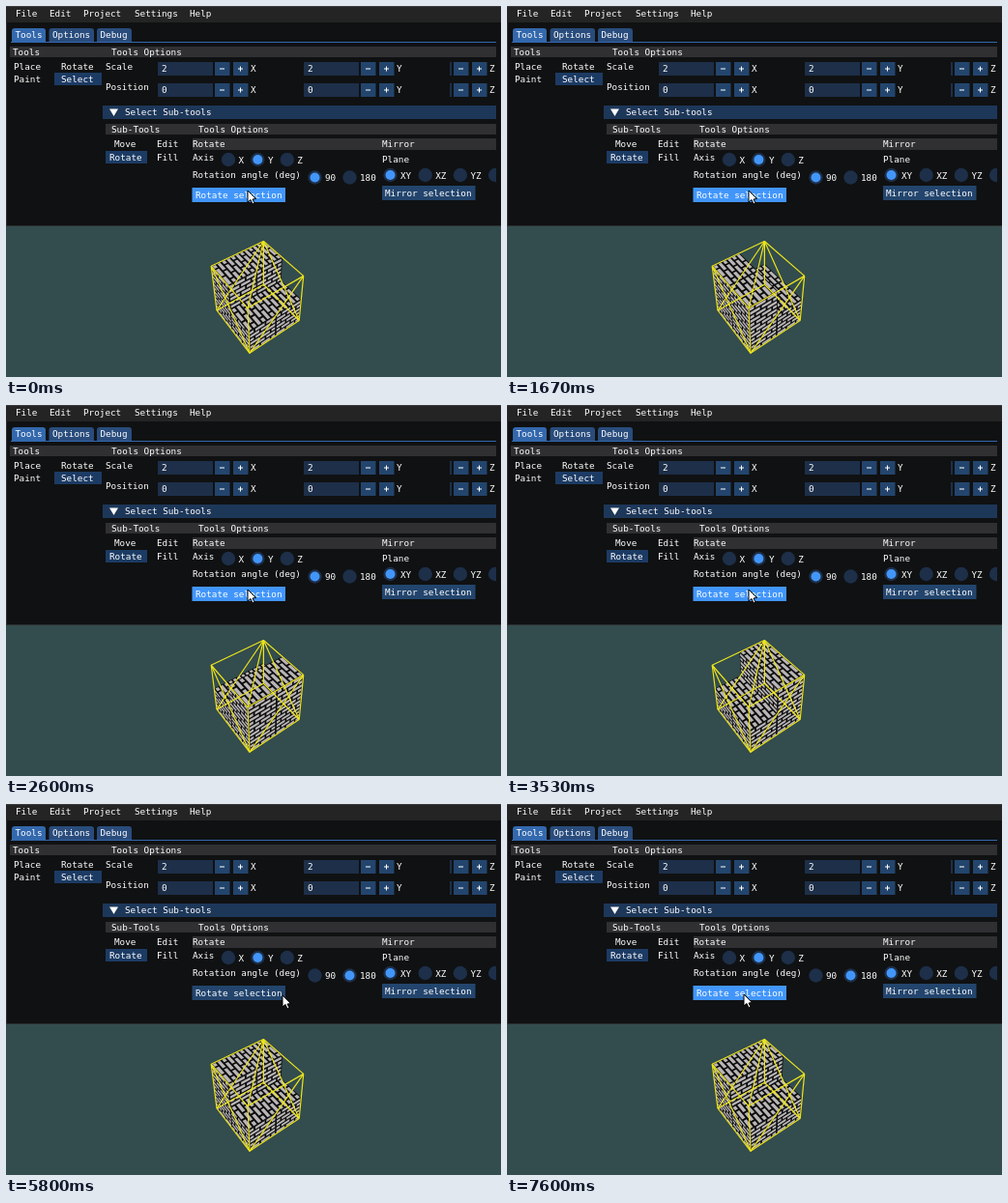
Recreate the animation shown at these times as an HTML page with a canvas. Size 512 px wide and 384 px high, loop 7.67 s.

```html
<!DOCTYPE html>
<html>
<head>
<meta charset="utf-8">
<style>
html, body { margin: 0; width: 100%; height: 100%; overflow: hidden; background: #334c4d; }
canvas { display: block; }
</style>
</head>
<body>
<canvas id="stage" width="512" height="384"></canvas>
<script>
const g = document.getElementById('stage').getContext('2d');
const LOOP = 7670;
const BUTTON = '#23456d', CHOSEN = '#1c3b64', FIELD = '#1d2f49', BRIGHT = '#4296fa';
const HEADER = '#303033', BORDER = '#2c2d31', YELLOW = '#ece51c';

function box(x1, y1, x2, y2, color) {
  g.fillStyle = color;
  g.fillRect(x1, y1, x2 - x1, y2 - y1);
}

function label(text, x, y) {
  g.fillStyle = '#fff';
  g.fillText(text, x, y + 3.4);
}

function disc(x, y, r, color) {
  g.fillStyle = color;
  g.beginPath();
  g.arc(x, y, r, 0, 7);
  g.fill();
}

function path(points) {
  g.beginPath();
  points.forEach(q => g.lineTo(...q));
}

function poly(points, color) {
  path(points);
  g.closePath();
  g.fillStyle = color;
  g.fill();
}

// ---- Mouse ----
const stops = [
  [0, 250, 191], [4900, 250, 191], [5300, 355, 177], [5610, 355, 177],
  [5800, 286, 198], [5930, 286, 198], [6150, 245, 197], [LOOP, 245, 197]
];

function mouseAt(t) {
  const i = stops.findIndex(s => s[0] > t);
  const [t0, x0, y0] = stops[i - 1], [t1, x1, y1] = stops[i];
  const k = (t - t0) / (t1 - t0), e = k * k * (3 - 2 * k);
  return [x0 + (x1 - x0) * e, y0 + (y1 - y0) * e];
}

function drawCursor([x, y]) {
  const shape = [[0, 0], [0, 12], [3, 9.5], [5, 14], [7, 13], [5, 9], [8.5, 8.6]];
  poly(shape.map(([dx, dy]) => [x + dx, y + dy]), '#fff');
  g.strokeStyle = '#000';
  g.lineWidth = 1;
  g.stroke();
}

// ---- Panel ----
function radio(x, y, text, on, mouse) {
  const hover = Math.hypot(mouse[0] - x, mouse[1] - y) < 7;
  disc(x, y, 7.2, hover ? BUTTON : FIELD);
  if (on) disc(x, y, 5, BRIGHT);
  label(text, x + 10.5, y + .5);
}

function stepButton(x, y, plus) {
  box(x, y - 7, x + 15.5, y + 7, BUTTON);
  box(x + 5, y - .5, x + 10, y + .5, '#fff');
  if (plus) box(x + 7, y - 2.5, x + 8, y + 2.5, '#fff');
}

function stepper(x, y, value, axis) {
  box(value ? x : x + 55, y - 7, x + 57, y + 7, FIELD);
  label(value, x + 4, y);
  stepButton(x + 59, y, false);
  stepButton(x + 78, y, true);
  label(axis, x + 96, y);
}

function drawPanel(t, mouse) {
  box(0, 0, 512, 228, '#101112');
  box(0, 17, 1, 228, BORDER);
  box(0, 227, 512, 228, BORDER);
  box(0, 0, 512, 17, '#242424');
  box(0, 0, 512, 1, '#39393c');
  [['File', 10], ['Edit', 45], ['Project', 80], ['Settings', 133], ['Help', 190]]
    .forEach(([s, x]) => label(s, x, 8));

  [['Tools', 6, 41], ['Options', 44.5, 91], ['Debug', 94, 130]].forEach(([s, x1, x2], i) => {
    g.fillStyle = i ? '#294c7c' : '#3368ad';
    g.beginPath();
    g.roundRect(x1, 23, x2 - x1, 14, [3, 3, 0, 0]);
    g.fill();
    label(s, x1 + 3.5, 30);
  });
  box(5, 37, 507, 38, '#3368ad');

  g.save();
  g.beginPath();
  g.rect(0, 0, 507, 228);
  g.clip();

  box(4, 42, 507, 53, HEADER);
  label('Tools', 7, 47.5);
  label('Tools Options', 109, 47.5);
  box(50, 69, 99, 82, CHOSEN);
  label('Place', 8, 62.5);
  label('Rotate', 57, 62.5);
  label('Paint', 8, 76);
  label('Select', 57, 76);

  [['Scale', '2', 65, 62.5], ['Position', '0', 87, 84]].forEach(([s, v, y, ty]) => {
    label(s, 103, ty);
    stepper(157, y, v, 'X');
    stepper(308, y, v, 'Y');
    stepper(404, y, '', 'Z');
  });

  box(100, 103, 507, 117, '#1d3759');
  poly([[107, 106.5], [116, 106.5], [111.5, 114]], '#fff');
  label('Select Sub-tools', 123, 110);

  box(103, 122, 507, 133, HEADER);
  label('Sub-Tools', 109, 128);
  label('Tools Options', 199, 128);
  label('Move', 112, 143);
  label('Edit', 156, 143);
  box(103, 150, 146, 163, CHOSEN);
  label('Rotate', 107, 157);
  label('Fill', 156, 157);

  box(193, 137, 507, 149, HEADER);
  label('Rotate', 193, 143);
  label('Mirror', 389, 143);
  label('Axis', 193, 157);
  ['X', 'Y', 'Z'].forEach((s, i) => radio(230 + 30.4 * i, 159, s, i == 1, mouse));
  label('Plane', 389, 159);
  label('Rotation angle (deg)', 193, 175);
  const half = t >= 5450;
  radio(319.5, 177.5, '90', !half, mouse);
  radio(355.5, 177.5, '180', half, mouse);
  ['XY', 'XZ', 'YZ', ''].forEach((s, i) => radio(397.5 + 36.2 * i, 175, s, i == 0, mouse));

  const hover = mouse[0] < 286 && mouse[1] >= 188;
  box(192.5, 188, 289, 203, hover ? BRIGHT : BUTTON);
  label('Rotate selection', 196, 196);
  box(389, 186, 485.5, 201, BUTTON);
  label('Mirror selection', 392, 194);
  g.restore();
}

// ---- Model: a runs to the left, b to the right, c up, from the nearest bottom corner ----
function project(a, b, c) {
  const w = 1 + .13 * a + .095 * b - .12 * c;
  return [(252 - 5.66 * a + 80 * b - 32 * c) / w,
          (359.3 - 3.35 * a - 2.9 * b - 84 * c) / w];
}

function patch(at, u1, v1, u2, v2, color) {
  poly([at(u1, v1), at(u2, v1), at(u2, v2), at(u1, v2)], color);
}

function brickFace(at) {
  const rows = 6, cols = 2.5;
  patch(at, 0, 0, 1, 1, '#0b0b0c');
  for (let r = 0; r < rows; r++) {
    for (let i = 0; i <= cols + 1; i++) {
      const start = i - (r % 2) / 2;
      const u1 = Math.max(.03, (start + .08) / cols), u2 = Math.min(.97, (start + .92) / cols);
      if (u2 > u1) patch(at, u1, (r + .18) / rows, u2, (r + .82) / rows, '#b9b5b6');
    }
  }
}

function voxel(a, b, c) {
  brickFace((u, v) => project(a, b + u / 2, c + v / 2));
  brickFace((u, v) => project(a + u / 2, b, c + v / 2));
  brickFace((u, v) => project(a + u / 2, b + v / 2, c + .5));
}

// Which half of the stairs is high, for each quarter turn
const high = [(a, b) => a > 0, (a, b) => b == 0, (a, b) => a == 0, (a, b) => b > 0];
const turns = [[1000, 1], [2100, 1], [3200, 1], [4300, 1], [6530, 2], [7270, 2]];

// Selection wireframe, seen through the bricks; each end is a corner written as its a, b, c
const wires = '000-100 000-010 100-110 010-110 000-001 100-101 010-011 110-111 ' +
  '001-101 001-011 101-111 011-111 111-001 111-100 111-010 101-000 011-000';

function drawWires() {
  g.strokeStyle = YELLOW;
  g.lineWidth = 1.2;
  wires.split(' ').forEach(pair => {
    path(pair.split('-').map(s => project(+s[0], +s[1], +s[2])));
    g.stroke();
  });
}

function drawModel(t) {
  const turn = turns.reduce((n, [at, q]) => n + (t >= at ? q : 0), 0) % 4;
  for (const a of [.5, 0])
    for (const b of [.5, 0])
      for (const c of [0, .5])
        if (!c || high[turn](a, b)) voxel(a, b, c);
  drawWires();
}

function draw(now) {
  const t = now % LOOP, mouse = mouseAt(t);
  g.font = '9.3px "DejaVu Sans Mono", monospace';
  box(0, 0, 512, 384, '#334c4d');
  drawModel(t);
  drawPanel(t, mouse);
  drawCursor(mouse);
}

const begin = performance.now();
function tick() {
  draw(performance.now() - begin);
  requestAnimationFrame(tick);
}
tick();
</script>
</body>
</html>
```
